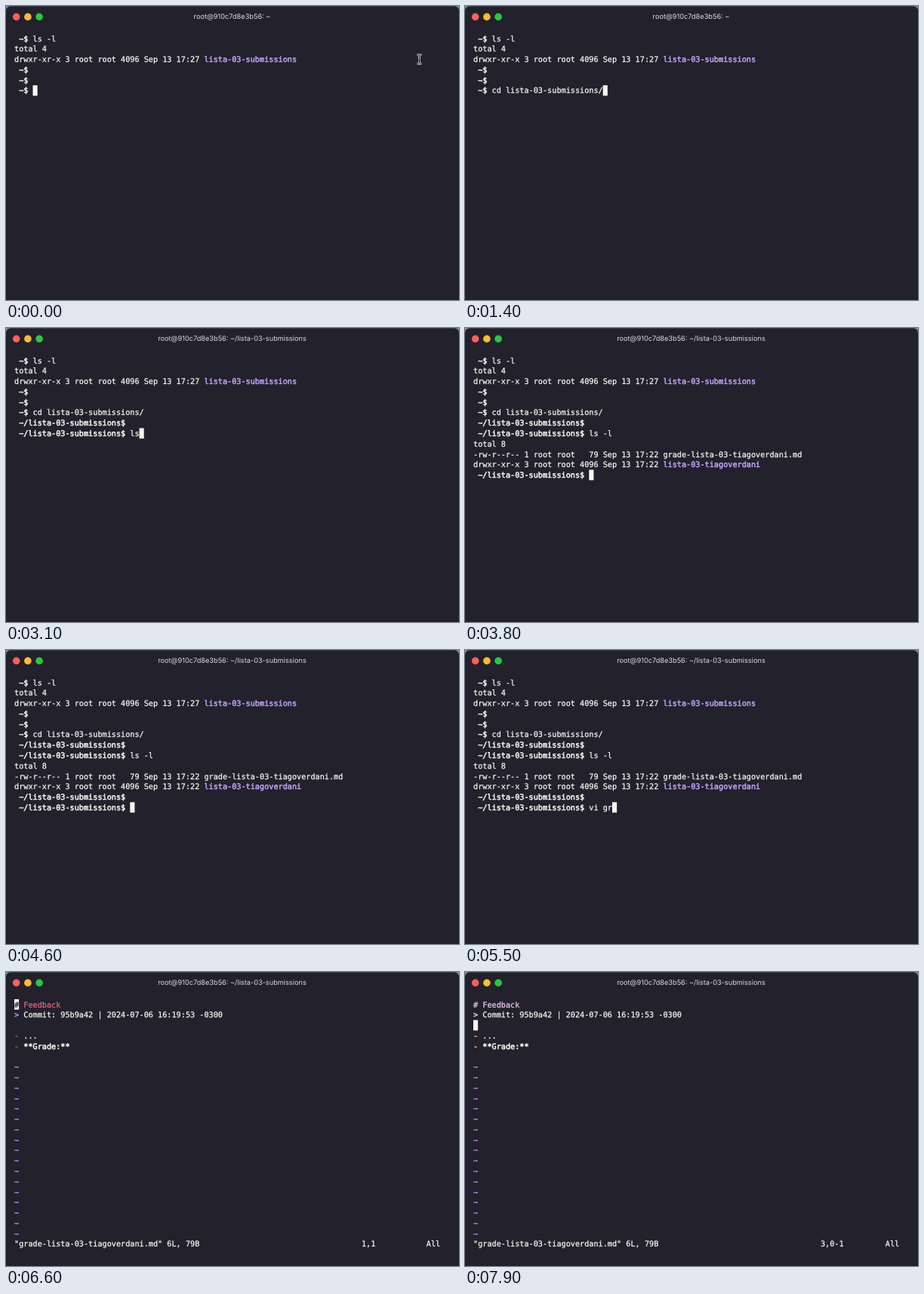
An HTML page with a canvas for the animation above (8 s loop, 600 by 389 pixels).

```html
<!DOCTYPE html>
<html lang="en">
<head>
<meta charset="utf-8">
<title>Terminal</title>
<style>
  html, body { margin: 0; width: 100%; height: 100%; overflow: hidden; background: #22212c; }
  canvas { display: block; width: 600px; height: 389px; }
</style>
</head>
<body>
<canvas id="stage"></canvas>
<script>
const W = 600, H = 389, LOOP = 8000;
const CELL = 6.132, LINE = 13.78, LEFT = 11, TOP = 36, BASE = 10.5;
const BG = '#22212c', FG = '#f8f8f2', PURPLE = '#c3a0f6', TILDE = '#a48df0';
const MONO = '10.19px "DejaVu Sans Mono", "Noto Sans Mono", monospace';
const PLAIN = 0.25, BOLD = 0.5;

const canvas = document.getElementById('stage');
const scale = window.devicePixelRatio || 1;
canvas.width = W * scale;
canvas.height = H * scale;
const ctx = canvas.getContext('2d');
ctx.scale(scale, scale);
ctx.textRendering = 'geometricPrecision';
ctx.lineJoin = 'round';

const HOME = ' ~$ ';
const FOLDER = 'lista-03-submissions';
const SUB = ` ~/${FOLDER}$ `;
const WORK = 'lista-03-tiagoverdani';
const FILE = `grade-${WORK}.md`;

const CD_AT = 1800, LIST_AT = 3600, VIM_AT = 6500, SETTLE_AT = 6800;

// Each entry: time it appears, row, prompt, and [time, typed text] steps.
const prompts = [
  { at: 0, row: 0, path: HOME, keys: [[0, 'ls -l']] },
  { at: 0, row: 3, path: HOME, keys: [] },
  { at: 0, row: 4, path: HOME, keys: [] },
  { at: 0, row: 5, path: HOME, keys: [[300, 'c'], [400, 'cd'], [600, 'cd '],
    [900, 'cd l'], [1000, 'cd li'], [1200, `cd ${FOLDER}/`]] },
  { at: CD_AT, row: 6, path: SUB, keys: [] },
  { at: 2400, row: 7, path: SUB, keys: [[2900, 'l'], [3100, 'ls'], [3200, 'ls '],
    [3300, 'ls -'], [3400, 'ls -l']] },
  { at: LIST_AT, row: 11, path: SUB, keys: [] },
  { at: 4300, row: 12, path: SUB, keys: [[4800, 'v'], [4900, 'vi'], [5100, 'vi '],
    [5300, 'vi g'], [5400, 'vi gr'], [5800, `vi ${FILE} `]] }
];

const moves = [[VIM_AT, 0, '1,1'], [7500, 1, '2,1'], [7700, 2, '3,0-1']];

const latest = (steps, t) => steps.filter(s => s[0] <= t).pop();

// Characters sit on the terminal's cell grid; a thin outline sets the weight.
function put(row, col, text, color = FG, weight = PLAIN) {
  ctx.font = MONO;
  ctx.textAlign = 'left';
  ctx.fillStyle = ctx.strokeStyle = color;
  ctx.lineWidth = weight;
  const y = TOP + row * LINE + BASE;
  [...text].forEach((ch, i) => {
    if (ch === ' ') return;
    const x = LEFT + (col + i) * CELL;
    ctx.fillText(ch, x, y);
    ctx.strokeText(ch, x, y);
  });
}

function block(row, col, under = '') {
  ctx.fillStyle = FG;
  ctx.fillRect(LEFT + col * CELL, TOP + row * LINE, CELL, LINE);
  put(row, col, under, BG);
}

function drawWindow(t) {
  const edge = ctx.createLinearGradient(0, 0, 0, H);
  edge.addColorStop(0, '#6f97a6');
  edge.addColorStop(1, '#3b1b26');
  ctx.fillStyle = edge;
  ctx.fillRect(0, 0, W, H);
  ctx.fillStyle = BG;
  ctx.beginPath();
  ctx.roundRect(0, 0.3, W, H - 0.6, [6, 6, 3, 3]);
  ctx.fill();

  ['#ff5f57', '#febc2e', '#28c840'].forEach((color, i) => {
    ctx.fillStyle = color;
    ctx.beginPath();
    ctx.arc(13.7 + i * 15.2, 14.4, 4.8, 0, Math.PI * 2);
    ctx.fill();
  });

  ctx.font = '400 9.2px Inter, "Open Sans", sans-serif';
  ctx.textAlign = 'center';
  ctx.fillStyle = '#dcdce0';
  ctx.fillText('root@910c7d8e3b56: ~' + (t < CD_AT ? '' : '/' + FOLDER), 299.5, 17.3);
}

function drawPointer(x, y) {
  ctx.beginPath();
  for (const s of [-1, 1]) {
    ctx.moveTo(x - 3, y + s * 6);
    ctx.quadraticCurveTo(x, y + s * 6, x, y + s * 4);
    ctx.quadraticCurveTo(x, y + s * 6, x + 3, y + s * 6);
  }
  ctx.moveTo(x, y - 5);
  ctx.lineTo(x, y + 5);
  ctx.moveTo(x - 1.5, y + 1.5);
  ctx.lineTo(x + 1.5, y + 1.5);
  for (const [color, width] of [['#e8e8e8', 2.6], ['#16151c', 1]]) {
    ctx.strokeStyle = color;
    ctx.lineWidth = width;
    ctx.stroke();
  }
}

function drawShell(t) {
  put(1, 0, 'total 4');
  put(2, 0, 'drwxr-xr-x 3 root root 4096 Sep 13 17:27');
  put(2, 41, FOLDER, PURPLE, BOLD);
  if (t >= LIST_AT) {
    put(8, 0, 'total 8');
    put(9, 0, '-rw-r--r-- 1 root root   79 Sep 13 17:22 ' + FILE);
    put(10, 0, 'drwxr-xr-x 3 root root 4096 Sep 13 17:22');
    put(10, 41, WORK, PURPLE, BOLD);
  }
  let caret;
  for (const { at, row, path, keys } of prompts) {
    if (t < at) continue;
    const step = latest(keys, t);
    const typed = step ? step[1] : '';
    put(row, 0, path, FG, BOLD);
    put(row, path.length, typed);
    caret = [row, path.length + typed.length];
  }
  block(...caret);
  if (t < 300) drawPointer(547.5, 70.5);
}

function drawVim(t) {
  const settled = t >= SETTLE_AT;
  let heading = '#efc9f3';
  if (!settled) {
    heading = ctx.createLinearGradient(0, 38, 0, 48);
    heading.addColorStop(0.1, '#a07cf0');
    heading.addColorStop(0.5, '#ee5a78');
    heading.addColorStop(1, '#f0647c');
  }
  const dash = settled ? '#e2c468' : '#b4562f';

  put(0, 0, '# Feedback', heading);
  put(1, 0, '>', settled ? '#d9d6e6' : '#b58cf5', BOLD);
  put(1, 2, 'Commit: 95b9a42 | 2024-07-06 16:19:53 -0300');
  put(3, 0, '-', dash, BOLD);
  put(3, 2, '...');
  put(4, 0, '-', dash, BOLD);
  put(4, 2, '**Grade:**', FG, BOLD);
  for (let row = 6; row <= 22; row++) put(row, 0, '~', TILDE, BOLD);

  const [, row, position] = latest(moves, t);
  put(23, 0, `"${FILE}" 6L, 79B`);
  put(23, 75, position);
  put(23, 89, 'All');
  block(row, 0, '#> '[row]);
}

const start = performance.now();

function frame() {
  const t = (performance.now() - start) % LOOP;
  drawWindow(t);
  if (t < VIM_AT) drawShell(t);
  else drawVim(t);
  requestAnimationFrame(frame);
}

frame();
</script>
</body>
</html>
```
